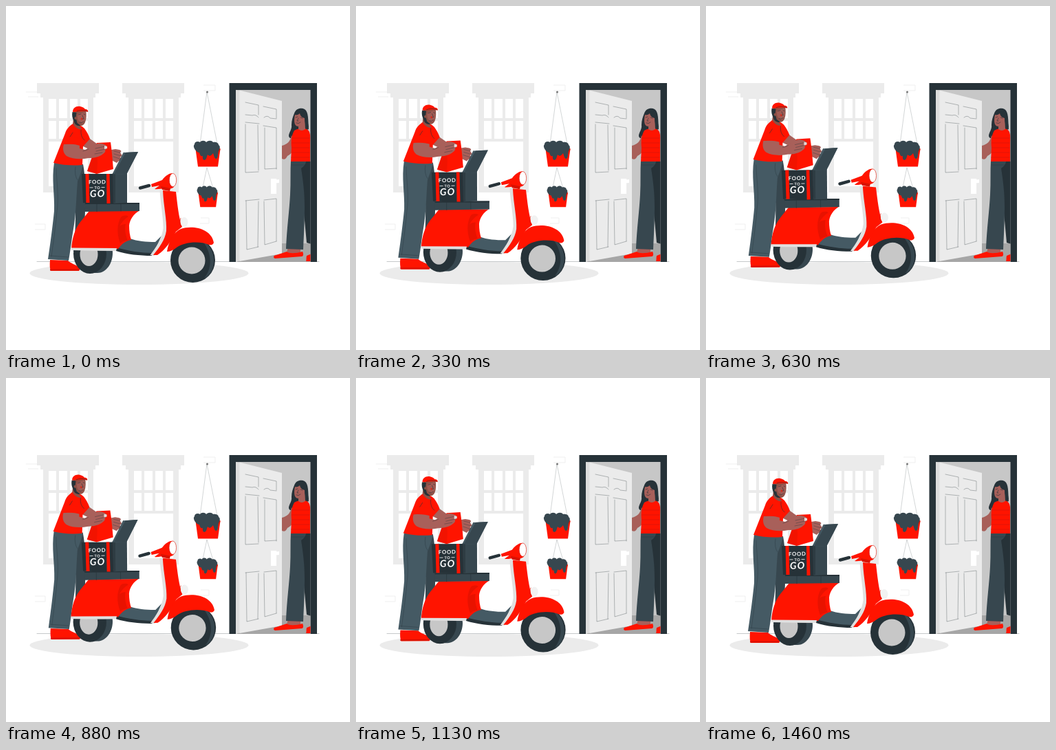
Recreate the animation shown at these times as an HTML page. Size 500 px wide and 500 px high, loop 1.5 s.

```html
<!DOCTYPE html>
<html lang="en">
<head>
<meta charset="utf-8">
<title>Food delivery</title>
<style>
html, body { margin: 0; width: 100%; height: 100%; overflow: hidden; background: #fff; }
svg { display: block; width: 100%; height: 100%; }
text { font-family: Lato, sans-serif; fill: #fff; text-anchor: middle; }
.r { fill: #ff1400; }
.dr { fill: #d91100; }
.k { fill: #263238; }
.d { fill: #37474f; }
.m { fill: #455a64; }
.l { fill: #ebebeb; }
.g { fill: #c7c7c7; }
.w { fill: #fff; }
.s { fill: #a8605a; }
.f { fill: #8c5046; }
.ln { fill: none; stroke: #263238; stroke-width: .6; stroke-linecap: round; stroke-linejoin: round; }
.thin { stroke-width: .4; }
.b { fill: none; stroke: #ebebeb; stroke-width: .8; }
</style>
</head>
<body>
<svg viewBox="0 0 500 500">
<defs>
  <g id="win">
    <path class="l" d="M169 112h90v15h-5v6h-80v-6h-5zM178 133h73v138h-73z"/>
    <path class="w" d="M186 135h11v28h-11zM201 135h12v28h-12zM217 135h11v28h-11zM232 135h11v28h-11zM186 167h11v26h-11zM201 167h12v26h-12zM217 167h11v26h-11zM232 167h11v26h-11zM186 197h57v65h-57z"/>
  </g>
  <clipPath id="opening"><path d="M334 122h108.500v250H334z"/></clipPath>
</defs>

<!-- wall -->
<path class="b" d="M45 125H29M32 132h15M287 115h17v8h-17M42 317h15v8H42M283 308h12v8h-13"/>
<use href="#win" x="-124"/>
<use href="#win"/>
<path class="ln" d="M45 371.500H455" opacity=".45"/>
<ellipse class="l" cx="193.500" cy="388.500" rx="159" ry="16.500"/>

<!-- doorway -->
<path class="k" d="M324.500 112H452v260H324.500z"/>
<g clip-path="url(#opening)">
  <path class="g" d="M334 122h109v250H334z"/>
  <path fill="#a6a6a6" d="M334 345h110v27H334z"/>
  <path fill="#dcdcdc" d="M334 122l7 2v246l-7 2z"/>
  <path class="l" d="M339.500 122.500L401 138v222l-61.500 11z"/>
  <path class="ln thin" opacity=".8" d="M348 140l19 4v14M374 146l19 4v13M348 158l10 1q5-2 9 3M375 162q5-4 9 1l9 1M348 169l20 2M366 173l1 66M348 172v70l19-1M374 174l19 3v60M376 177v60l17-1M348 283l20-2M349 283l1 71 17-4M367 284l-1 66M375 282l18-2v62M375 284l1 63 17-5"/>
  <path class="w" d="M385 251h8v22h-8zM386 253l11-1v5l-11 1z"/>

  <!-- customer -->
  <path class="k" d="M419 156c2-7 10-9 15-6 6 4 5 15 6 29l-20 8c-2 6-8 7-9 2 0-5 5-10 4-16 0-7 2-12 4-17z"/>
  <path class="s" d="M415 188c-2 9-6 13-14 15v19c4 2 6 0 8-4 7-4 11-9 12-19z"/>
  <path class="r" d="M437 363c-1 3 0 6-1 8h8v-11z"/>
  <path class="k" d="M426 226h18v120l-7-2z"/>
  <path class="s" d="M410 350h18v10l-21 3z"/>
  <path class="r" d="M408 357c4 3 12 3 23 0 2 4 1 7-1 7l-39 3c-4-2-1-5 2-5z"/>
  <path class="d" d="M414 225h22c0 5-3 8-7 11 3 20 5 35 5 56 0 22-1 40-2 62l-25-1c1-28 5-57 6-79 1-18 0-34 1-49z"/>
  <path class="ln" d="M415 231h21" opacity=".6"/>
  <path class="r" d="M419 181c4-3 14-4 18-2 5 2 6 9 5 20v27h-28l1-20c-1-10 0-18 4-25z"/>
  <path d="M415 192h27M415 199h27M415 206h27M415 213h27M414 220h28" fill="none" stroke="#c21510" stroke-width=".5"/>
  <path class="s" d="M420 158c4-4 11-3 14 1l1 20c-4 3-8 2-10 0v-4c-6 0-7-7-5-17z"/>
  <path class="k" d="M419 158c3-8 15-9 18-1l3 20c-4-2-6-7-6-14-4-1-6-3-7-7-2 2-4 3-8 2z"/>
  <path class="ln" d="M421 162l3-1M428 162l3 1M422 170q3 2 6-1M425 163l-2 4h2"/>
</g>

<!-- hanging pots -->
<path class="ln thin" opacity=".5" d="M282 201l10-76 15 75M285 268l7-33 10 33"/>
<circle cx="292.500" cy="125" r="1.500" fill="#777"/>
<g id="pot">
  <path class="r" d="M275.500 208h36l-3.500 25.500h-29z"/>
  <path class="dr" d="M275.500 207h36l-.7 4h-34.500z"/>
  <path class="d" d="M275 209c-2-3-3-6-1-8 0-4 5-5 8-3 2-3 7-3 9 0 3-3 8-3 10 0 4-1 8 1 8 4 3 2 2 6 0 8l-1 6c0 6-3 8-5 4l-2-6c-3 4-5 5-8 2l-2 6c-3 4-6 1-5-4-3 1-4-1-5-5-3 0-4-2-6-4z"/>
</g>
<use href="#pot" transform="translate(63.300 103) scale(.785 .81)"/>

<!-- courier -->
<g id="man">
  <path class="r" d="M64 369l26 1c4 4 11 6 16 9q3 3 0 6H65q-2-5-1-16z"/>
  <path class="dr" d="M64 382.500h42v2H64z"/>
  <path class="d" d="M94 230h18c4 19 3 46 3 68 0 22-7 40-10 60l-7-1c3-23 3-47 3-65z"/>
  <path class="m" d="M70 228l42 2c-2 10-5 17-8 25-2 24-2 47-6 69-3 17-4 30-7 46l-30-2c4-27 7-50 9-70 1-24-4-46 0-70z"/>
  <path class="ln" opacity=".6" d="M73 236c1 24 4 43 1 63-2 22-5 43-8 65M101 234q-2 12 3 19M64 363l26 2"/>
  <path class="s" d="M110 188l12 5 14 10-9 8-15-7z"/>
  <path class="r" d="M99 170c6 2 11 4 15 8 3 4 6 9 8 15l-10 11-1 27q-22 2-42-3l17-43c2-6 5-10 13-15z"/>
  <path class="f" d="M98 156c1-5 5-8 9-8l9 3c1 6 1 13-1 18-2 5-6 6-9 4l4 6c-5 1-10-3-13-8 1-5 1-10 1-15z"/>
  <path class="s" d="M104 157l11-3c2 9 0 15-4 17-6-2-8-7-7-14z" opacity=".7"/>
  <path class="k" d="M96.500 154l6 1-1 7 2 8 5 4c-5 1-9-2-10-7-2-4-3-8-2-13z"/>
  <circle class="f" cx="101.500" cy="163" r="2"/>
  <path class="r" d="M97 154c0-6 5-9 11-8 5 1 6 3 7 4 3 0 5 2 4 4-7-2-12 0-22 0z"/>
  <path class="ln" d="M103 153q7-3 15 0M105 158l4-1M113 157l2 1M111 159l2 5h-3M107 169q3 2 6-1"/>
  <circle class="r" cx="110" cy="164" r="1.500" opacity=".6"/>
  <path class="ln" d="M109 180q-1 10 5 15M97 184q-6 8-9 16"/>
</g>

<g id="scooter">
  <!-- wheels -->
  <path class="d" d="M123 332h10c12 0 22 11 22 27s-10 29-22 29h-10z"/>
  <ellipse class="k" cx="122" cy="360" rx="24" ry="29"/>
  <ellipse class="g" cx="120.500" cy="361" rx="13" ry="17"/>
  <path class="ln" d="M137 343q12 17 0 37" opacity=".6"/>
  <circle class="k" cx="271.500" cy="369.500" r="32.500"/>
  <path class="d" d="M286 342c19 8 23 43 2 54 12-15 12-36-2-54z"/>
  <circle class="g" cx="270" cy="370" r="19.500"/>

  <!-- deck and rear body -->
  <path class="m" d="M160 350l20-12c11 4 24 5 37 5l9-9-12 28c-18 0-37-3-54-8z"/>
  <path class="k" d="M160 351c18 5 36 8 53 8l-1 4c-18 0-36-2-52-7z"/>
  <path class="r" d="M121 298h72c-7 4-13 12-14 21 0 8 1 15 3 21-8 1-14 6-19 13H95c1-15 5-29 13-39 4-5 8-10 13-16z"/>
  <path class="dr" d="M178 306c-5 3-10 8-13 14 4-3 7-3 9-3-2 8 0 17 3 24-4 0-8 1-11 4-5-14-5-28 1-38 3-3 8-3 11-1z" opacity=".6"/>
  <path d="M95 351.500l66 .5-1 4q-34 0-65-1z" fill="#e0e0e0"/>

  <!-- steering column -->
  <path d="M223.500 268h7c0 22 4 43 3 59-3 14-11 26-18 36l-6-1c8-10 17-24 19-39 0-17-4-36-5-55z" fill="#e0e0e0"/>
  <path class="r" d="M228 268l19 2c2 17 4 38 9 51l-9 7c-7 14-16 27-27 34h-6c9-11 17-22 19-35 1-16-4-36-5-59z"/>
  <path class="r" d="M234 357c2-14 9-28 20-33 18-6 45 0 48 20-1 3-4 4-7 3-14-6-36-4-47 4-5 4-10 6-14 6z"/>
  <ellipse cx="259" cy="314" rx="5.500" ry="7" fill="#f2f2f2"/>
  <path d="M254 308q-3 6 0 12" fill="none" stroke="#d91100" stroke-width=".6"/>
  <path class="r" d="M211 259l16-6c5-7 11-10 15-10l2 20c-3 3-7 3-12 2-7 0-11 2-16 1l7-5-11 2z"/>
  <path class="dr" d="M225 262l14 3-1 4-11-2z"/>
  <path d="M195 264.500l13-3.500" stroke="#263238" stroke-width="4.500" stroke-linecap="round"/>
  <ellipse class="w" cx="242.500" cy="253" rx="5.200" ry="9.700" stroke="#d91100" stroke-width=".6"/>

  <!-- seat -->
  <path class="d" d="M115 286h79v12l-79 1z"/>
  <path class="k" d="M115 286h79v2h-79z"/>
  <path class="ln" d="M132 288v11M167 288v10"/>
</g>

<!-- parcel box, bag and hands -->
<g id="box">
  <path class="k" d="M110 244h46v43l-44-1z"/>
  <path class="d" d="M155 243h21v43l-20 1z"/>
  <path class="k" d="M155 244l4-1v43l-4 1z" opacity=".5"/>
  <path class="s" d="M153 209l6-1 6 1c3 1 3 3 1 4l2 3c1 2 0 3-2 3l1 3c0 2-1 3-3 3l-3 3-8-4z"/>
  <path class="ln" d="M157 211l9 2M157 215l10 3M156 219l9 3" opacity=".6"/>
  <path class="r" d="M132 199l20-1c2 13 3 28 4 39l-24 7-14-4z"/>
  <path class="dr" d="M132 199l1 29-1 16-14-4z" opacity=".35"/>
  <path class="m" d="M171 213l21-1-17 33-20-1z"/>
  <path class="d" d="M174 213l18-1-17 33-18-1z"/>
  <path class="ln" d="M171 213l-16 31"/>
  <path class="r" d="M115.500 244h5l1 42h-5zM146 244h4.500l1 43h-5z"/>
  <g transform="rotate(-1 132 262)">
    <text x="132.800" y="258.500" font-size="7.800" font-weight="700" letter-spacing=".7">FOOD</text>
    <text x="132.800" y="266.200" font-size="5.500" font-weight="700" letter-spacing=".5">TO</text>
    <path d="M121.500 263.800h5M138.500 263.800h5" stroke="#fff" stroke-width=".8"/>
    <text x="133" y="277.500" font-size="14" font-weight="700" font-style="italic" letter-spacing="1.300">GO</text>
  </g>
</g>
<g id="arm">
  <path class="s" d="M84 201c-2 6-1 13 4 17 9 5 22 5 32 3 9 0 16-2 21-6 3-2 4-4 3-6 3-1 4-3 3-5-5-5-12-5-17-3l-15 8-8-2v-7z"/>
  <path class="r" d="M86 191c9-2 19 0 26 5l-1 8c-10-3-18-4-28-3z"/>
  <path class="ln" d="M130 207l14-3M131 211l13-3M129 215l11-2M112 211q5-1 8-3" opacity=".65"/>
  <path class="w" d="M143 203l4 1v3l-4 1z" opacity=".75"/>
</g>
</svg>
<script>
const loop = 1500;
const el = id => document.getElementById(id);
const still = ["man", "box", "arm"].map(el);
const scooter = el("scooter");

function draw(ms) {
  const p = (1 - Math.cos(ms / loop * 2 * Math.PI)) / 2;
  const sway = `translate(0 ${-6.3 * p}) rotate(${-0.5 * p} 183 271)`;
  for (const part of still) part.setAttribute("transform", sway);
  const sx = 1 + 0.008 * p;
  scooter.setAttribute("transform", `${sway} translate(${250 * (1 - sx)} 0) scale(${sx} 1)`);
}

function tick() {
  draw(performance.now() % loop);
  requestAnimationFrame(tick);
}
draw(0);
tick();
</script>
</body>
</html>
```
